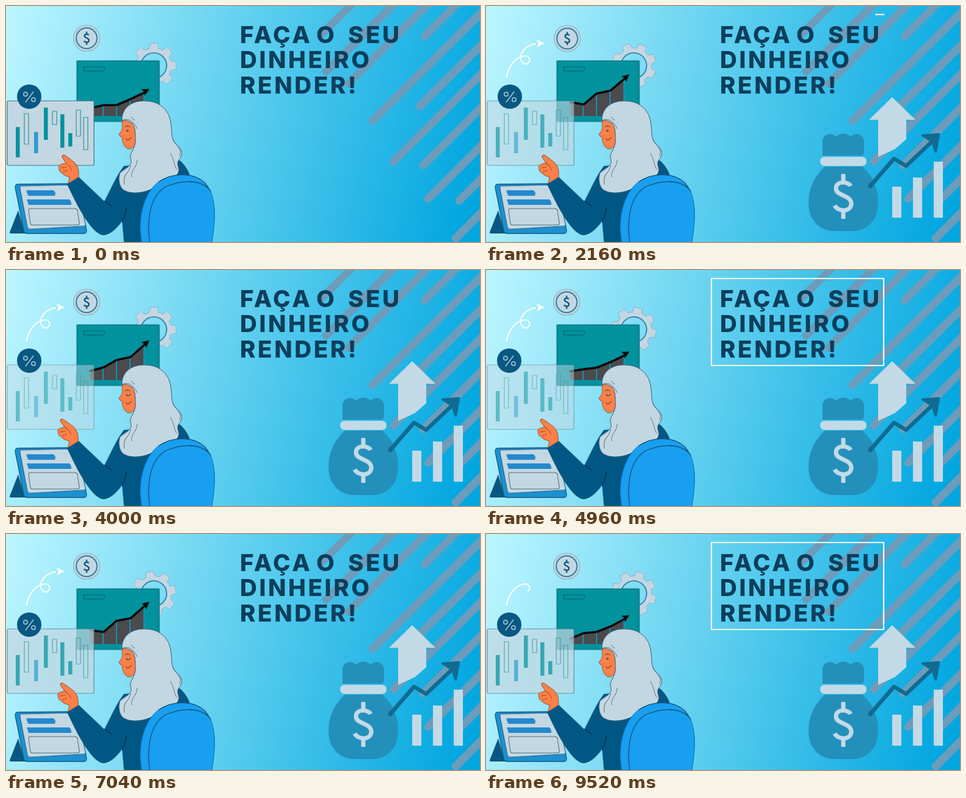
These frames come from a looping animation (776x388 px, 9.6 s). An HTML page with a canvas:

```html
<!DOCTYPE html>
<html lang="pt">
<head>
<meta charset="utf-8">
<title>Faça o seu dinheiro render</title>
<style>
html, body { margin: 0; width: 100%; height: 100%; overflow: hidden; background: #5bcdee; }
canvas { display: block; width: 100vw; height: 100vh; }
</style>
</head>
<body>
<canvas id="stage" width="776" height="388"></canvas>
<script>
const ctx = document.getElementById('stage').getContext('2d');
const LOOP = 9600;
const LIGHT = '#c3d7e2', NAVY = '#0a5882', INK = '#17455f', TEAL = '#00929d', BLUE = '#189ff0', SKIN = '#ff8047';

const clamp = v => Math.max(0, Math.min(1, v));
const ease = v => v * v * (3 - 2 * v);
const ramp = (t, a, b) => ease(clamp((t - a) / (b - a)));

// keys: rows of [time, value, value, ...]
function tween(t, keys) {
  let i = 0;
  while (i < keys.length - 2 && t >= keys[i + 1][0]) i++;
  const [a, b] = [keys[i], keys[i + 1]];
  const k = clamp((t - a[0]) / (b[0] - a[0]));
  return a.slice(1).map((v, n) => v + (b[n + 1] - v) * k);
}

function shape(d, fill, stroke, width = 1) {
  const p = new Path2D(d);
  if (fill) { ctx.fillStyle = fill; ctx.fill(p); }
  if (stroke) { ctx.strokeStyle = stroke; ctx.lineWidth = width; ctx.stroke(p); }
}

function disc(x, y, r, fill, stroke, width = 1) {
  ctx.beginPath();
  ctx.arc(x, y, r, 0, Math.PI * 2);
  if (fill) { ctx.fillStyle = fill; ctx.fill(); }
  if (stroke) { ctx.strokeStyle = stroke; ctx.lineWidth = width; ctx.stroke(); }
}

function box(x, y, w, h, r, fill, stroke, width = 1) {
  ctx.beginPath();
  ctx.roundRect(x, y, w, h, r);
  if (fill) { ctx.fillStyle = fill; ctx.fill(); }
  if (stroke) { ctx.strokeStyle = stroke; ctx.lineWidth = width; ctx.stroke(); }
}

function trace(points, color, width) {
  ctx.beginPath();
  points.forEach(([x, y]) => ctx.lineTo(x, y));
  ctx.strokeStyle = color;
  ctx.lineWidth = width;
  ctx.stroke();
}

function partial(d, length, drawn, color, width) {
  if (drawn <= 0) return;
  ctx.save();
  ctx.lineCap = 'butt';
  ctx.setLineDash([length * drawn, length * 2]);
  shape(d, null, color, width);
  ctx.restore();
}

function background() {
  const g = ctx.createLinearGradient(0, 90, 776, 270);
  g.addColorStop(0, '#b9f4ff');
  g.addColorStop(0.5, '#5bcdee');
  g.addColorStop(1, '#00a6e0');
  ctx.fillStyle = g;
  ctx.fillRect(0, 0, 776, 388);
  const ends = [[517, 46], [524, 108], [560, 128], [685, 50], [600, 189], [677, 165],
    [634, 256], [683, 262], [691, 317], [742, 320], [736, 382]];
  for (const [x, y] of ends) trace([[x, y], [x + 400, y - 400]], '#6d9cbb', 13);
}

function title() {
  ctx.font = '800 38.5px Inter, sans-serif';
  ctx.textAlign = 'left';
  ctx.textBaseline = 'alphabetic';
  ctx.letterSpacing = '3.6px';
  ctx.fillStyle = '#0b3f5c';
  ctx.fillText('FAÇA', 383, 61);
  ctx.fillText('O', 508, 61);
  ctx.fillText('SEU', 560, 61);
  ctx.fillText('DINHEIRO', 383, 102);
  ctx.fillText('RENDER!', 383, 144);
  ctx.letterSpacing = '0px';
}

function frameLine(t) {
  const p = t % 4160;
  const drawn = ramp(p, 80, 640) - ramp(p, 1700, 2200);
  partial('M652 14H369V157H651V13', 852, drawn, '#fff', 2.2);
}

function gear(t) {
  ctx.save();
  ctx.translate(242, 98);
  ctx.rotate(t / 4000 * Math.PI / 4);
  ctx.beginPath();
  for (let i = 0; i < 8; i++) {
    const mid = i * Math.PI / 4 - Math.PI / 2;
    for (const [r, a] of [[29, -0.27], [37, -0.17], [37, 0.17], [29, 0.27]]) {
      ctx.lineTo(r * Math.cos(mid + a), r * Math.sin(mid + a));
    }
    ctx.arc(0, 0, 29, mid + 0.27, mid + Math.PI / 4 - 0.27);
  }
  ctx.closePath();
  ctx.moveTo(21, 0);
  ctx.arc(0, 0, 21, 0, Math.PI * 2, true);
  ctx.fillStyle = LIGHT;
  ctx.fill('evenodd');
  ctx.strokeStyle = '#8aaabd';
  ctx.lineWidth = 0.8;
  ctx.stroke();
  disc(0, 0, 21, null, '#277aa6', 1.6);
  ctx.restore();
}

function panel(t) {
  box(116, 90, 135, 100, 1, TEAL, '#176a7b', 1.2);
  box(127, 100, 34, 7, 3, null, '#075f71', 1.2);
  const ys = tween(t % 4800, [
    [0, 168, 163, 163, 153, 138],
    [1120, 158, 164, 146, 141, 123],
    [2160, 158, 162, 144, 139, 114],
    [3360, 163, 148, 124, 131, 97],
    [4000, 166, 160, 148, 143, 117],
    [4720, 172, 163, 161, 152, 135],
    [4800, 168, 163, 163, 153, 138]
  ]);
  const pts = [138, 160, 181, 204, 233].map((x, i) => [x, ys[i]]);
  ctx.save();
  ctx.beginPath();
  pts.forEach(p => ctx.lineTo(...p));
  ctx.lineTo(233, 181);
  ctx.lineTo(138, 181);
  ctx.clip();
  for (const [x, w] of [[138, 20], [160, 20], [182, 20], [204, 21]]) {
    ctx.fillStyle = '#4b4a4c';
    ctx.fillRect(x, 90, w, 91);
    ctx.fillStyle = '#1a94ba';
    ctx.fillRect(x + w, 90, 1.3, 91);
  }
  ctx.restore();
  const [a, b] = pts.slice(-2);
  trace([...pts.slice(0, -1), [b[0] - 3, b[1] + 3]], '#080a0c', 3.6);
  ctx.save();
  ctx.translate(b[0] + 1, b[1] - 1);
  ctx.rotate(Math.atan2(b[1] - a[1], b[0] - a[0]));
  shape('M1 0L-11 -6L-9 0L-11 6Z', '#080a0c');
  ctx.restore();
}

function board(t) {
  ctx.globalAlpha = tween(t, [[0, 1], [1120, 0.64], [2160, 0.6], [4000, 0.47], [5920, 0.52], [8160, 0.88], [9520, 0.7], [9600, 0.7]])[0];
  box(2, 156, 142, 106, 2, LIGHT, '#476f85', 1.2);
  const solid = [[16, 199, 50, TEAL], [46, 207, 35, '#319bcf'], [62, 167, 53, TEAL], [89, 178, 55, TEAL], [102, 209, 22, TEAL]];
  for (const [x, y, h, c] of solid) box(x, y, 6.5, h, 0, c);
  for (const [x, y, h] of [[30, 177, 50], [76, 173, 22], [115, 171, 43], [127, 183, 53]]) {
    box(x, y, 7, h, 0, null, '#329199', 1.2);
  }
  ctx.globalAlpha = 1;
}

function dollar(x, y, s, color, width) {
  ctx.save();
  ctx.translate(x, y);
  ctx.scale(s, s);
  ctx.lineCap = 'butt';
  shape('M12 -17C8 -25 -12 -26 -12 -13C-12 0 13 -3 13 12C13 26 -9 26 -14 15', null, color, width);
  shape('M0 -37V-22M0 22V37', null, color, width);
  ctx.restore();
}

function badges(t) {
  const sway = tween(t, [[0, 0], [1120, 1], [2160, 1], [4000, 0], [9600, 0]])[0];
  const x = 132 + sway, y = 53 + sway / 2;
  disc(x, y, 21.5, LIGHT, '#93afbd', 1.2);
  disc(x, y, 17, null, '#2d7fa0', 2);
  dollar(x, y, 0.29, NAVY, 8);
  const bx = 38 + sway, by = 149;
  disc(bx, by, 20, NAVY);
  trace([[bx + 7, by - 8], [bx - 6, by + 9]], '#9fcbdc', 1.5);
  disc(bx - 6, by - 4, 3.2, null, '#9fcbdc', 1.5);
  disc(bx + 7, by + 5, 3.2, null, '#9fcbdc', 1.5);
}

function curl(t) {
  const p = t % 8640;
  const drawn = clamp((p - 420) / 830);
  partial('M34 117C36 98 50 83 64 82C73 82 74 93 66 95C58 97 54 84 59 76C65 65 76 62 91 61', 122, drawn, '#fff', 2);
  if (drawn === 1) shape('M82 55L95 61L84 68L86 61Z', '#fff');
}

function tablet() {
  shape('M20 336L6 372Q6 374 9 374H31Z', NAVY);
  shape('M15 298Q15 293 20 293L112 292Q117 292 118 297L132 369Q132 374 127 374H35Q30 374 29 369Z', '#1b91cf', '#125d85', 1.3);
  shape('M23 300Q22 296 26 296L111 294Q115 294 116 298L130 358Q131 362 126 362L40 367Q36 367 35 363Z', LIGHT, '#24658a', 1);
  shape('M33 303H78L81 307L80 312H36Z', '#2488cb');
  shape('M34 318H104Q107 321 107 327H37Z', '#2488cb');
  shape('M40 333H113Q116 333 117 336L120 357Q120 360 117 360H43Q40 360 40 357L37 336Q37 333 40 333Z', null, '#506f80', 1.1);
}

function woman(t) {
  const shift = tween(t, [[0, 0], [2160, 0], [4000, -3], [8160, -3], [9520, -1], [9600, -1]])[0];
  ctx.save();
  ctx.transform(1, 0, -shift / 42, 1, shift * 288 / 42, 0);
  shape('M102 291L104 281Q94 279 91 274Q86 272 87 267Q85 262 91 260L98 258L92 249Q91 244 96 245Q106 252 113 258Q119 266 119 272L119 283Z', SKIN, '#81412d', 0.8);
  shape('M98 258L104 263M91 266L99 265M93 273L101 270M104 263L108 270', null, '#a34a2c', 1);
  ctx.restore();

  const closed = t > 3080 && t < 8840;
  shape('M100 293L119 281L161 321C172 300 180 280 193 263L285 254C294 263 301 272 303 288L260 388H193L190 354C180 367 172 375 160 377C145 376 125 348 100 293Z', '#005783');
  shape('M161 321C165 321 168 326 173 329M190 354Q195 346 197 332', null, '#0a2d48', 1.2);
  shape('M191 185C189 194 192 200 189 205L185 211Q186 215 190 216C190 227 196 236 204 235L213 229L216 184Z', SKIN, '#71412e', 0.7);
  if (closed) shape('M197 205Q201 209 204 204', null, INK, 1.2);
  else disc(199, 205, 1.6, INK);
  shape('M195 199Q199 195 203 199', null, INK, 1);
  shape('M196 218Q200 223 205 216', null, '#733528', 1.2);
  shape('M190 188C189 168 205 156 226 156C255 156 268 174 270 194C272 209 270 220 279 228C292 238 288 248 283 253C277 262 287 266 281 276C272 287 254 292 238 301C222 309 197 310 189 299C184 291 184 280 187 274C197 265 208 263 204 251C201 243 212 235 212 221C211 211 213 202 207 193Q199 187 190 188Z', LIGHT, '#315b72', 1);
  shape('M190 188Q205 181 215 202M211 188Q208 187 205 182M273 218C278 231 290 235 284 247M269 242C277 255 274 262 280 269M204 262C202 276 190 277 194 293M215 253C215 265 203 270 206 281', null, '#4d788e', 1);
}

function chair() {
  shape('M222 388C215 351 224 309 250 289C275 272 316 273 331 298C346 321 342 359 337 388Z', BLUE, '#096aa9', 1);
  shape('M235 388C230 349 237 312 260 298C289 284 322 286 335 304', null, '#164f7b', 1.3);
  shape('M250 289C275 272 316 273 331 298', null, '#124b73', 1.2);
}

function money(t) {
  ctx.globalAlpha = ramp(t, 40, 720);
  const pale = '#c2dae6', bag = '#2390bb', dark = '#116a91';
  shape('M551 246V226C549 211 565 206 573 215C579 208 591 208 597 215C605 206 620 211 619 226V240Q619 246 613 246Z', bag);
  shape('M555 264H616C632 278 642 298 642 324C642 352 624 370 600 370H570C546 370 528 352 528 324C528 298 539 278 555 264Z', bag);
  box(547, 248, 76, 15, 7, pale);
  dollar(585, 313, 1, pale, 7);
  shape('M665 150L703 187H688V219L670 235L642 248V187H627Z', pale);
  for (const [x, y] of [[665, 297], [699, 282], [733, 256]]) box(x, y, 15, 348 - y, 0, pale);
  trace([[629, 296], [668, 251], [688, 263], [733, 220]], dark, 6.5);
  shape('M713 214Q711 211 715 211L741 209Q744 209 743 213L738 240Q736 243 734 239L729 224Z', dark);
  ctx.globalAlpha = 1;
}

function draw(now) {
  const t = now % LOOP;
  ctx.lineCap = ctx.lineJoin = 'round';
  background();
  title();
  frameLine(t);
  money(t);
  gear(t);
  panel(t);
  board(t);
  badges(t);
  curl(t);
  tablet();
  woman(t);
  chair();
}

const start = performance.now();
function tick() {
  draw(performance.now() - start);
  requestAnimationFrame(tick);
}
tick();
</script>
</body>
</html>
```
